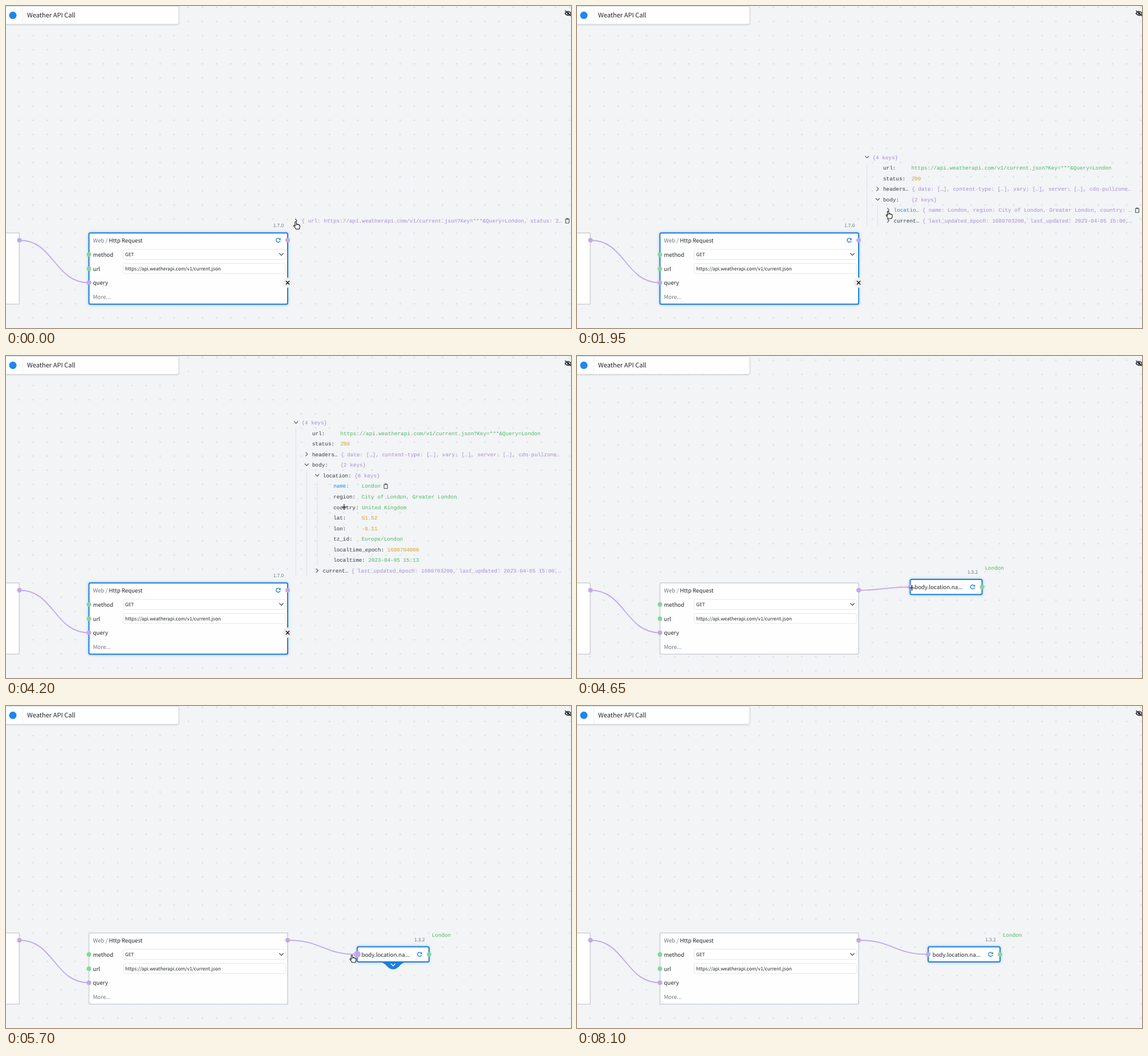
Animation, 991 px wide and 565 px high, one loop 8.25 s. Source, as an HTML page:

```html
<!DOCTYPE html>
<html lang="en">
<head>
<meta charset="utf-8">
<title>Weather API Call</title>
<style>
  html, body { margin: 0; width: 100%; height: 100%; overflow: hidden; background: #f2f4f6; }
  svg { display: block; width: 991px; height: 565px; }
  text { font-family: 'Noto Sans CJK SC', 'Noto Sans CJK JP', 'Noto Sans CJK', 'Noto Sans', sans-serif;
    font-size: 9.7px; fill: #212529; text-rendering: geometricPrecision; }
  .title { font-size: 11.1px; }
  .small { font-size: 8.3px; }
  .grey { fill: #6f7880; }
  .mono text { font-family: 'Liberation Mono', 'Courier New', monospace; font-size: 9.29px; }
  .mono .key { fill: #343a40; }
  .mono .obj { fill: #a88bd6; }
  .mono .str { fill: #4fb866; }
  .mono .num { fill: #d8a01e; }
  .line { fill: none; stroke: #495057; stroke-width: 1.1; stroke-linecap: round; stroke-linejoin: round; }
  .blue { stroke: #1c7fdc; stroke-width: 1.3; }
  .card { fill: #fefefe; stroke: #cdd2d6; stroke-width: 1.6; }
  .selected { stroke: #1c7fdc; stroke-width: 2; filter: drop-shadow(0 0 2px #1c7fdc70); }
  .field { fill: #fff; stroke: #e3e6e9; stroke-width: 1; }
  .wire { fill: none; stroke: #c4abe9; stroke-width: 1.9; }
  .any { fill: #c2a9e7; }
  .ok { fill: #86d69b; }
  .guide { stroke: #dfe2e6; stroke-width: 1; }
  .guide.hot { stroke: #8b9299; stroke-width: 1.3; }
  .clip { display: none; }
  .hot > .clip { display: inline; }
  .mono .hot > .key { fill: #228be6; }
  .cursor path { paint-order: stroke; }
</style>
</head>
<body>
<svg viewBox="0 0 991 565">
  <defs>
    <pattern id="dots" x="10.2" y="39.6" width="24.77" height="24.77" patternUnits="userSpaceOnUse">
      <circle cx="12.385" cy="12.385" r="1.4" fill="#dee1e5"/>
    </pattern>
    <g id="refresh">
      <path class="line blue" d="M3.2 1.4A3.6 3.6 0 1 1 2.7 -2.4"/>
      <path d="M4.2 -4.2V-.6H.6Z" fill="#1c7fdc"/>
    </g>
    <g id="clip">
      <rect class="line" x="-3" y="-3.4" width="6" height="7.4" rx=".8"/>
      <path d="M-1.6 -4.6H1.6V-2.4H-1.6Z" fill="#495057"/>
    </g>
  </defs>

  <rect width="991" height="565" fill="url(#dots)"/>

  <rect x="-5" y=".5" width="308" height="31.5" rx="3" fill="#fefefe" stroke="#d5d9dd"
    style="filter:drop-shadow(0 1px 1px #0002)"/>
  <circle cx="12" cy="16.3" r="6.5" fill="#1f87ea"/>
  <path d="M29.500 1V31.500" stroke="#eceef0"/>
  <text class="title" x="37" y="20.400">Weather API Call</text>

  <g transform="translate(986 13)">
    <path class="line" d="M-5.500 0Q0 -7 5.500 0Q0 7 -5.500 0Z" style="stroke:#212529;stroke-width:1.5"/>
    <circle r="2" fill="#212529"/>
    <path class="line" d="M-5 -4.500L5 4.500" style="stroke:#212529;stroke-width:1.6"/>
  </g>

  <rect class="card" x="-10" y="398.300" width="33.300" height="125" rx="2"/>
  <rect class="card" id="request" x="145.500" y="398.300" width="348.500" height="125" rx="2.500"/>
  <path class="wire" d="M23.500 411C84.500 411 84.500 485.500 145.500 485.500"/>
  <path class="wire" id="wire"/>

  <text x="152.500" y="415"><tspan class="grey">Web / </tspan>Http Request</text>
  <text x="152.500" y="439.500">method</text>
  <text x="152.500" y="464.500">url</text>
  <text x="152.500" y="489.300">query</text>
  <text class="grey" x="152.500" y="514">More...</text>
  <rect class="field" x="205.500" y="427" width="284.500" height="17.500" rx="2"/>
  <rect class="field" x="205.500" y="451.800" width="284.500" height="17.500" rx="2"/>
  <text class="small" x="209" y="438.900">GET</text>
  <text class="small" x="209" y="463.700">https://api.weatherapi.com/v1/current.json</text>
  <path class="line" d="M479.500 434L483 437.500L486.500 434"/>
  <circle class="any" cx="23.500" cy="411" r="4"/>
  <circle class="any" cx="494" cy="411" r="4"/>
  <circle class="any" cx="145.500" cy="485.500" r="4"/>
  <circle class="ok" cx="145.500" cy="436" r="4"/>
  <circle class="ok" cx="145.500" cy="461" r="4"/>

  <g id="extras">
    <use href="#refresh" x="477.500" y="411"/>
    <circle cx="494" cy="485.500" r="9" fill="#eef0f2"/>
    <path class="line" d="M491.300 482.800l5.400 5.400m0 -5.400l-5.400 5.400" style="stroke:#111;stroke-width:1.5"/>
    <text class="small grey" x="468.700" y="387.800">1.7.0</text>
  </g>

  <g class="mono" id="panel"></g>

  <g id="getter">
    <path id="lip" d="M40 27C51 27 52 39.500 63 39.500S75 27 86 27Z" fill="#1c7fdc"/>
    <path id="lipMark" class="line" d="M59.500 30L63 33.500L66.500 30" style="stroke:#fff;stroke-width:1.4"/>
    <rect class="card selected" width="126" height="26.500" rx="2.500"/>
    <text x="7.500" y="17.300">body.location.na...</text>
    <use href="#refresh" x="109.500" y="13.300"/>
    <circle class="any" id="port" cy="13.300"/>
    <circle class="ok" cx="126" cy="13.300" r="4"/>
    <text class="small grey" x="100.200" y="-10">1.3.2</text>
    <g class="mono"><text class="str" x="131" y="-17.200">London</text></g>
  </g>

  <g id="tip">
    <rect x="606.500" y="451.500" width="44" height="18" fill="#f0f0f0" stroke="#d2d4d6"/>
    <text class="small" x="615" y="463.500">object</text>
  </g>

  <g class="cursor" id="cursor">
    <path id="hand" d="M-1.500 7.500V1.200a1.200 1.200 0 0 1 2.400 0V5c.5-.9 2-.8 2.200.2c.6-.6 1.800-.4 2 .5c.7-.5 1.800 0 1.800 1v2.600c0 1.400-.9 2-1 3.700H0c-.3-1.600-2.600-3.400-3.700-5.300c-.5-1 .8-1.800 1.600-1z"
      fill="#fff" stroke="#111" stroke-width="1.100" style="paint-order:normal"/>
    <path id="up" d="M0 -5.500L3 -1.800H.9V5.500H-.9V-1.800H-3Z" fill="#111" stroke="#fff" stroke-width="1.500"/>
    <path id="cross" d="M-5 0H5M0 -5V5" stroke="#111" stroke-width="1.200"/>
    <path id="arrow" d="M0 0V11l2.600-2.400l1.700 3.900l1.700-.8l-1.700-3.800H8Z" fill="#111" stroke="#fff" stroke-width="1.500"/>
  </g>
</svg>
<script>
const LOOP = 8250, STEP = 150, ROW = 18.57, BASE = 377, CHAR = 5.574;
const $ = id => document.getElementById(id);
const show = (el, on) => { el.style.display = on ? '' : 'none'; };
const escape = s => s.replace(/&/g, '&amp;');

// Rows: depth, chevron ('>' closed, 'v' open), key, value, class
const link = 'https://api.weatherapi.com/v1/current.json?Key=***&Query=London';
const head = [
  [0, 'v', '', '{4 keys}', 'obj'],
  [1, '', 'url:', link, 'str'],
  [1, '', 'status:', '200', 'num'],
  [1, '>', 'headers…', '{ date: […], content-type: […], vary: […], server: […], cdn-pullzone…', 'obj'],
  [1, 'v', 'body:', '{2 keys}', 'obj']
];
const current = [2, '>', 'current…', '{ last_updated_epoch: 1680703200, last_updated: 2023-04-05 15:00,…', 'obj'];
const trees = {
  line: [[0, '>', '', `{ url: ${link}, status: 2…`, 'obj']],
  tree: [...head,
    [2, '>', 'locatio…', '{ name: London, region: City of London, Greater London, country: …', 'obj'],
    current],
  full: [...head,
    [2, 'v', 'location:', '{8 keys}', 'obj'],
    [3, '', 'name:', 'London', 'str'],
    [3, '', 'region:', 'City of London, Greater London', 'str'],
    [3, '', 'country:', 'United Kingdom', 'str'],
    [3, '', 'lat:', '51.52', 'num'],
    [3, '', 'lon:', '-0.11', 'num'],
    [3, '', 'tz_id:', 'Europe/London', 'str'],
    [3, '', 'localtime_epoch:', '1680704008', 'num'],
    [3, '', 'localtime:', '2023-04-05 15:13', 'str'],
    current]
};

function rowMarkup([depth, mark, key, value, kind], y) {
  const x = 518.5 + 18.55 * depth;
  const vx = key ? x + Math.max(49.5, key.length * CHAR + 5.5) : x;
  const clipX = Math.min(985.5, vx + value.length * CHAR + 9);
  const chevron = mark === 'v' ? 'm-3.2 -1.6l3.2 3.2l3.2 -3.2' : 'm-1.6 -3.2l3.2 3.2l-3.2 3.2';
  return `<g class="row">
    ${mark ? `<path class="line" d="M${x - 9.7} ${y - .5}${chevron}"/>` : ''}
    <text class="key" x="${x}" y="${y + 3}">${key}</text>
    <text class="${kind}" x="${vx}" y="${y + 3}">${escape(value)}</text>
    <use class="clip" href="#clip" x="${clipX}" y="${y}"/></g>`;
}

function treeMarkup(name) {
  const rows = trees[name];
  const yAt = i => BASE - ROW * (rows.length - 1 - i);
  const guide = (x, i, end) => `<path class="guide" d="M${x} ${yAt(i) + 9.5}V${end}"/>`;
  let out = '';
  if (name !== 'line') out += guide(508.5, 0, 385.5) + guide(527.5, 4, 385.5);
  if (name === 'full') out += guide(546, 5, 367.5);
  return `<g id="${name}">${out}${rows.map((r, i) => rowMarkup(r, yAt(i))).join('')}</g>`;
}
$('panel').innerHTML = Object.keys(trees).map(treeMarkup).join('');

// Cursor track: time, x, y, shape, hovered row, hovered guide
const track = [
  [0, 508.5, 378.5, 'hand', 0],
  [450, 508.5, 384, 'up', -1, 0],
  [1200, 526.5, 371, 'up', -1, 1],
  [1350, 533, 368, 'up', -1, 1],
  [1500, 540, 362, 'hand', 5],
  [1650, 543, 361, 'hand', 5],
  [1800, 545, 360, 'hand', 5],
  [1950, 546, 360, 'hand', 5],
  [2250, 546, 362, 'up', -1, 2],
  [2550, 547, 361.5, 'up', -1, 2],
  [3000, 558, 340, 'cross', 12],
  [3150, 572, 308, 'cross', 10],
  [3300, 582, 277, 'cross', 9],
  [3450, 590, 248, 'cross', 7],
  [3600, 594, 228, 'cross', 6],
  [3900, 596, 228, 'cross', 6],
  [4200, 593, 265, 'cross', 6],
  [4350, 590, 325, 'cross'],
  [4500, 587, 380, 'cross'],
  [4650, 587.5, 407, 'cross'],
  [4800, 597, 420, 'cross'],
  [4950, 610, 432, 'cross'],
  [5100, 619, 437.5, 'cross'],
  [5400, 614, 438, 'hand'],
  [5550, 610, 437.5, 'hand'],
  [5700, 607, 437, 'hand'],
  [7500, 640, 446, 'arrow'],
  [7650, 728, 475, 'arrow'],
  [7800, 838, 515, 'arrow'],
  [7950, 947, 552, 'arrow'],
  [8100, 0, 0, '']
];
const shapes = ['hand', 'up', 'cross', 'arrow'];

function render(time) {
  const t = Math.floor(time % LOOP / STEP + 1e-6) * STEP;
  const [, x, y, shape, row = -1, guide = -1] = track.findLast(k => k[0] <= t);

  $('cursor').setAttribute('transform', `translate(${x} ${y})`);
  shapes.forEach(s => show($(s), s === shape));

  const made = t >= 4350, dragging = made && t < 5400;
  const open = t < 450 ? 'line' : t < 2250 ? 'tree' : 'full';
  show($('panel'), !made);
  show($('extras'), !made);
  $('request').classList.toggle('selected', !made);
  for (const name in trees) show($(name), name === open);
  const mark = (sel, hot) => $(open).querySelectorAll(sel)
    .forEach((el, i) => el.classList.toggle('hot', i === hot));
  mark('.row', row);
  mark('.guide', guide);

  $('dots').setAttribute('patternTransform', `translate(0 ${dragging ? 5 : 0})`);

  // The new node hangs from the cursor until it is dropped
  const nx = dragging ? x - 3 : 616, ny = dragging ? y - 15 : 422.5;
  const py = ny + 13.3, mid = (494 + nx) / 2;
  show($('getter'), made);
  show($('wire'), made);
  $('getter').setAttribute('transform', `translate(${nx} ${ny})`);
  $('wire').setAttribute('d', `M494 411C${mid} 411 ${mid} ${py} ${nx} ${py}`);

  const lip = t >= 5400 && t < 7650;
  show($('lip'), lip);
  show($('lipMark'), lip);
  $('port').setAttribute('r', t >= 5400 && t < 7500 ? 6 : 4);
  show($('tip'), t >= 7050 && t < 7500);
}

function tick(now) {
  render(now);
  requestAnimationFrame(tick);
}
render(0);
requestAnimationFrame(tick);
</script>
</body>
</html>
```
